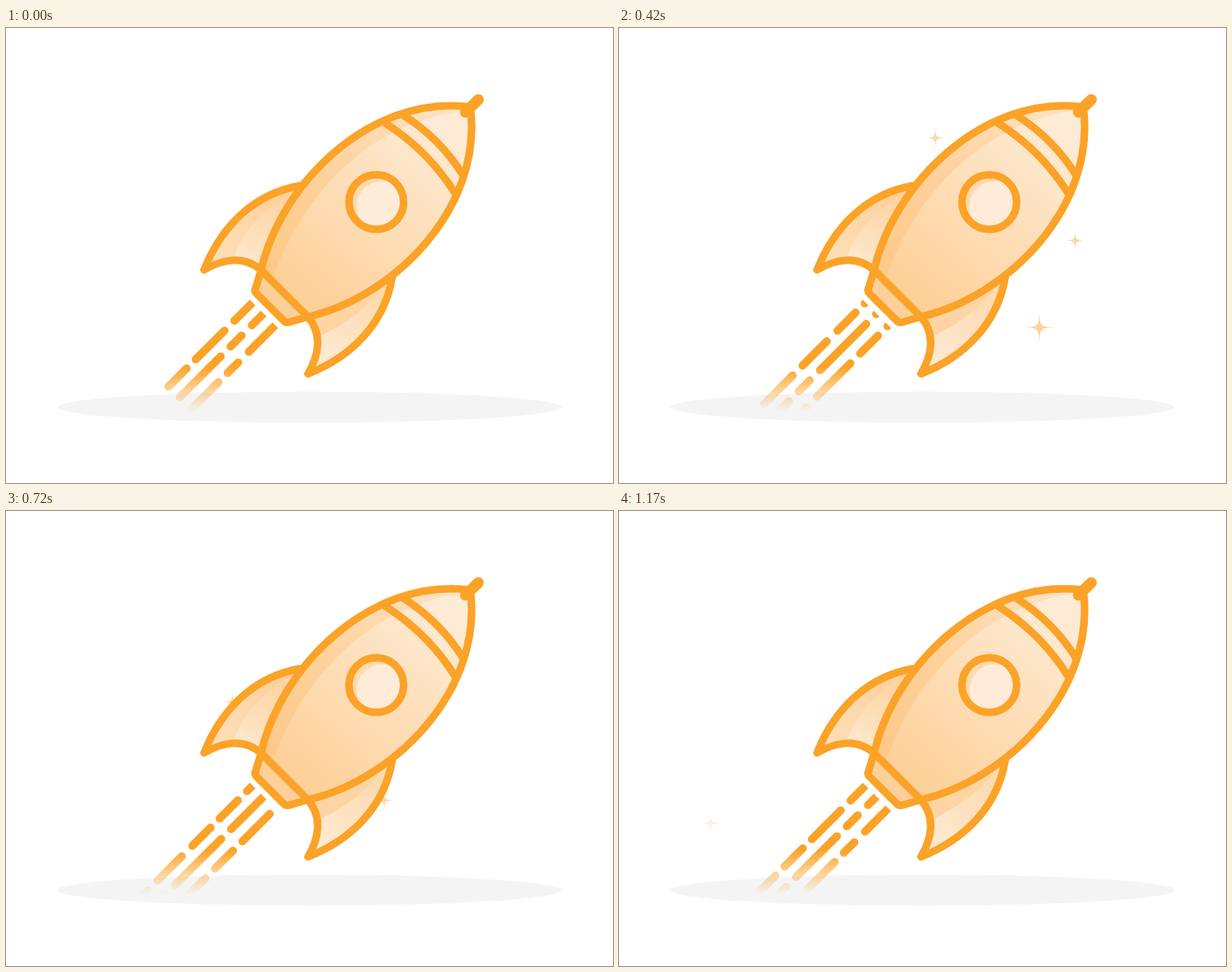
An HTML page for the animation above (1200 ms loop, 800x600 px).

```html
<!DOCTYPE html>
<html lang="en">
<head>
<meta charset="utf-8">
<title>Rocket</title>
<style>
html, body { margin: 0; width: 100%; height: 100%; overflow: hidden; background: #fff; }
svg { display: block; width: 100vw; height: 100vh; }
.line { fill: none; stroke: #fba328; stroke-width: 10; stroke-linecap: round; stroke-linejoin: round; }
</style>
</head>
<body>
<svg viewBox="0 0 800 600">
  <defs>
    <linearGradient id="bodyLight" gradientUnits="userSpaceOnUse" x1="375" y1="360" x2="570" y2="130">
      <stop offset="0" stop-color="#fdcf96"/><stop offset="1" stop-color="#feebd5"/>
    </linearGradient>
    <linearGradient id="bodyShade" gradientUnits="userSpaceOnUse" x1="345" y1="330" x2="570" y2="110">
      <stop offset="0" stop-color="#fdc887"/><stop offset=".45" stop-color="#fdd19a"/><stop offset="1" stop-color="#fde2c1"/>
    </linearGradient>
    <linearGradient id="finShade" gradientUnits="userSpaceOnUse" x1="375" y1="220" x2="275" y2="310">
      <stop offset="0" stop-color="#fdcf98"/><stop offset="1" stop-color="#fddfba"/>
    </linearGradient>
    <linearGradient id="finLight" gradientUnits="userSpaceOnUse" x1="362" y1="225" x2="305" y2="312">
      <stop offset="0" stop-color="#fdd4a2"/><stop offset="1" stop-color="#fee9d0"/>
    </linearGradient>
    <linearGradient id="finLow" gradientUnits="userSpaceOnUse" x1="490" y1="350" x2="410" y2="445">
      <stop offset="0" stop-color="#fddaae"/><stop offset="1" stop-color="#feebd5"/>
    </linearGradient>
    <linearGradient id="fade" gradientUnits="userSpaceOnUse" x1="0" y1="447" x2="0" y2="506">
      <stop offset="0" stop-color="#fba328"/><stop offset="1" stop-color="#fba328" stop-opacity="0"/>
    </linearGradient>
    <path id="body" d="M611 104C480 88 362 205 336 320L329 343Q327 347 330 350L366 386Q369 389 373 388L397 381C512 355 629 237 612 105Z"/>
    <path id="finA" d="M387 208C330 218 285 258 261 319C283 306 313 298 337 320L400 260Z"/>
    <path id="finB" d="M397 380C419 404 411 434 398 456C459 432 499 387 509 329L457 317Z"/>
    <clipPath id="inBody"><use href="#body"/></clipPath>
    <clipPath id="inFinA"><use href="#finA"/></clipPath>
    <clipPath id="inFinB"><use href="#finB"/></clipPath>
    <clipPath id="inPort"><circle cx="488" cy="229.5" r="36"/></clipPath>
    <clipPath id="jet"><path d="M300 337L440 477L440 600L0 600L0 337Z"/></clipPath>
  </defs>

  <ellipse cx="400" cy="500" rx="332" ry="20.5" fill="#f4f4f4"/>
  <g clip-path="url(#jet)">
    <path id="flames" fill="none" stroke="url(#fade)" stroke-width="10.6" stroke-linecap="round"/>
  </g>
  <g id="stars" fill="#fcd19b"></g>

  <use href="#finA" fill="url(#finShade)"/>
  <path clip-path="url(#inFinA)" fill="url(#finLight)" d="M294 325C302 280 330 243 385 212L400 330Z"/>
  <use href="#finB" fill="url(#finLow)"/>
  <path clip-path="url(#inFinB)" fill="#fdd5a4" d="M385 375L457 317L510 320C488 360 455 388 412 407Z"/>

  <use href="#body" fill="url(#bodyShade)"/>
  <g clip-path="url(#inBody)">
    <path fill="url(#bodyLight)" d="M350 335C382 235 470 122 611 108L640 200L540 330L398 395Z"/>
    <path fill="#fdd09a" d="M337 320L397 380L371 392L324 346Z"/>
  </g>

  <g class="line">
    <path d="M387 208C330 218 285 258 261 319C283 306 313 298 337 320L397 380C419 404 411 434 398 456C459 432 499 387 509 329"/>
    <path d="M499 125Q556 161 592 218M522 114Q572 145 603 195"/>
    <use href="#body"/>
  </g>
  <path class="line" d="M605.5 111L622.5 94.5" style="stroke-width:14.5"/>

  <circle cx="488" cy="229.5" r="36" fill="#fddab0"/>
  <circle cx="496" cy="236" r="34" fill="#feecd8" clip-path="url(#inPort)"/>
  <circle cx="488" cy="229.5" r="36" class="line"/>
</svg>
<script>
const LOOP = 1200, STEP = 30, PERIOD = 169;

// Each jet runs along x + y = sum; dashes are x ranges at time zero.
const jets = [
  { sum: 687, dashes: [[214, 238], [250, 288], [301, 333], [347, 371]] },
  { sum: 716, dashes: [[229, 283], [296, 310.5], [324, 385]] },
  { sum: 747, dashes: [[244, 280], [292, 306], [320, 364], [377, 400.5]] }
];

// Position at time zero, velocity per ms, radius, strength and visible span.
const stars = [
  { x: 582.8, y: -4.3, vx: -.395, vy: .3556, r: 14, alpha: .85, from: 150, to: 1200 },
  { x: 745, y: 138.2, vx: -.3425, vy: .338, r: 14, alpha: .85, from: 150, to: 1040 },
  { x: 873.2, y: 81.8, vx: -.76, vy: .745, r: 20, alpha: 1, from: 150, to: 530 },
  { x: 946.9, y: -468.8, vx: -.76, vy: .745, r: 20, alpha: 1, from: 735, to: 1100 }
];

const flames = document.getElementById('flames');
const sky = document.getElementById('stars');

function starPath(r) {
  const a = r * .04, b = r * .08;
  return `M0 ${-r}C${a} ${-b} ${b} ${-a} ${r} 0C${b} ${a} ${a} ${b} 0 ${r}` +
    `C${-a} ${b} ${-b} ${a} ${-r} 0C${-b} ${-a} ${-a} ${-b} 0 ${-r}Z`;
}

for (const s of stars) {
  s.el = document.createElementNS('http://www.w3.org/2000/svg', 'path');
  s.el.setAttribute('d', starPath(s.r));
  sky.appendChild(s.el);
}

function draw(t) {
  const shift = PERIOD * t / LOOP;
  let d = '';
  for (const { sum, dashes } of jets)
    for (const offset of [0, PERIOD])
      for (const [a, b] of dashes) {
        const x1 = a + offset - shift, x2 = b + offset - shift;
        d += `M${x1} ${sum - x1}L${x2} ${sum - x2}`;
      }
  flames.setAttribute('d', d);

  for (const s of stars) {
    const fade = Math.min(1, (t - s.from) / 75, (s.to - t) / 75);
    s.el.setAttribute('opacity', s.alpha * Math.max(0, fade));
    s.el.setAttribute('transform', `translate(${s.x + s.vx * t} ${s.y + s.vy * t})`);
  }
}

const start = performance.now();
function tick() {
  const t = (performance.now() - start) % LOOP;
  draw(Math.floor(t / STEP) * STEP);
  requestAnimationFrame(tick);
}
draw(0);
requestAnimationFrame(tick);
</script>
</body>
</html>
```
